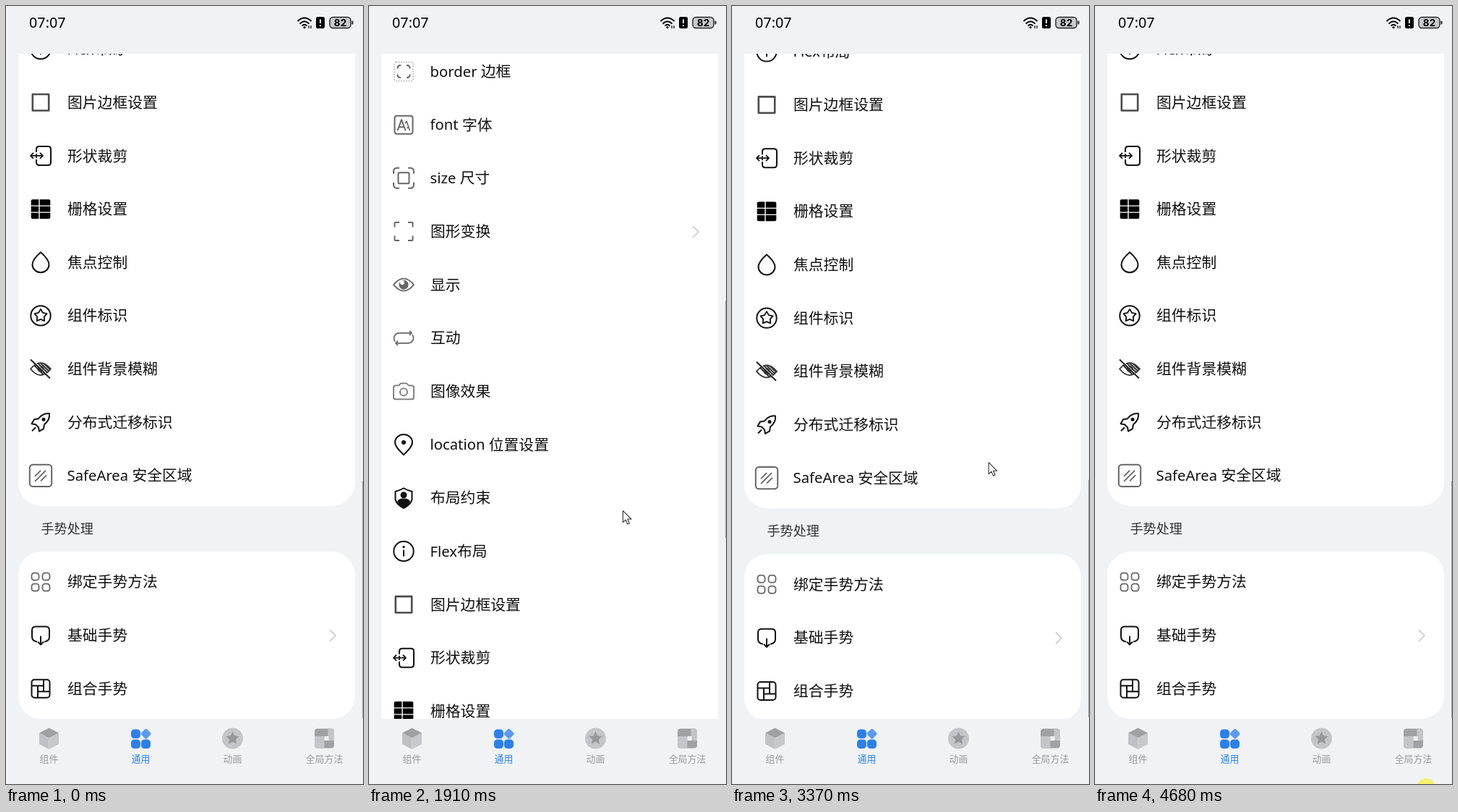
Recreate the animation shown at these times as an HTML page with a canvas. Size 494 by 1075 pixels, loop 4750 ms.

```html
<!DOCTYPE html>
<html lang="zh">
<head>
<meta charset="utf-8">
<title>组件列表</title>
<style>
  html, body { margin: 0; width: 100%; height: 100%; overflow: hidden; background: #f0f2f4; }
  canvas { display: block; width: 494px; height: 1075px; }
</style>
</head>
<body>
<canvas id="stage"></canvas>
<script>
const W = 494, H = 1075, LOOP = 4750;
const TOP = 66, BOTTOM = 985, ROW = 73.65, HEADING = 63.4, PAD = 5;
const INK = '#111', GRAY = '#666', PAPER = '#f0f2f4', BLUE = '#2b80e9';
const CJK = '"Noto Sans CJK SC", "Noto Sans CJK", sans-serif';
const LATIN = '"Noto Sans", sans-serif';

const canvas = document.getElementById('stage');
const ctx = canvas.getContext('2d');
const ratio = window.devicePixelRatio || 1;
canvas.width = W * ratio;
canvas.height = H * ratio;

// Path builders
const ring = (r, x = 0, y = 0) => `M${x - r} ${y}a${r} ${r} 0 1 1 ${2 * r} 0a${r} ${r} 0 1 1 ${-2 * r} 0z`;
const box = (x, y, w, h, r = 0) => {
  const arc = (dx, dy) => `a${r} ${r} 0 0 1 ${dx} ${dy}`;
  return `M${x + r} ${y}h${w - 2 * r}${arc(r, r)}v${h - 2 * r}${arc(-r, r)}h${2 * r - w}${arc(-r, -r)}v${2 * r - h}${arc(r, -r)}z`;
};
const square = (s, r) => box(-s, -s, 2 * s, 2 * s, r);
const star = (r, inner) => 'M' + Array.from({ length: 10 }, (_, i) => {
  const a = i * Math.PI / 5, d = i % 2 ? inner : r;
  return `${d * Math.sin(a)} ${-d * Math.cos(a)}`;
}).join('L') + 'z';
const corners = (s, gap, r) => [[-1, -1], [1, -1], [1, 1], [-1, 1]].map(([x, y]) =>
  `M${x * gap} ${y * s}H${x * (s - r)}Q${x * s} ${y * s} ${x * s} ${y * (s - r)}V${y * gap}`).join('');

// Painters
function line(d, color = INK, width = 2, dash = []) {
  ctx.strokeStyle = color;
  ctx.lineWidth = width;
  ctx.setLineDash(dash);
  ctx.stroke(new Path2D(d));
}
function fill(d, color = INK) {
  ctx.fillStyle = color;
  ctx.fill(new Path2D(d));
}
function write(text, x, y, font, color = INK, align = 'left') {
  ctx.font = font;
  ctx.fillStyle = color;
  ctx.textAlign = align;
  ctx.fillText(text, x, y);
  return ctx.measureText(text).width;
}
function at(x, y, draw) {
  ctx.save();
  ctx.translate(x, y);
  draw();
  ctx.restore();
}

const EYE = 'M-14 0Q-7 -8.5 0 -8.5T14 0Q7 8.5 0 8.5T-14 0z';
const icons = {
  tap() { line(ring(13)); fill(ring(5)); },
  touch() { line(ring(13)); line(ring(7)); },
  drag() { line(corners(13, 5, 3)); line('M-6 0H6M0 -6V6'); },
  puzzle() {
    line('M-14 -2Q-15 -10 -8 -12Q-4 -13 0 -10M-9 -1Q-10 -7 -5 -8', GRAY, 1.7);
    line('M-5 -4H-1C-4 -10 6 -11 4 -5H10V0C16 -3 16 7 10 4V11H5C7 5 -2 5 0 11H-6V6C-12 9 -12 0 -6 2', GRAY, 1.7);
  },
  unlock() {
    line('M-12.5 -2V-7Q-12 -13 -7 -13T-3 -7V-1', INK, 2.5);
    fill(box(-9, -3, 20, 17, 4));
    fill(ring(2.5, 1, 5), '#fff');
  },
  focus() {
    line(ring(4), INK, 1.8);
    line(ring(8), INK, 2);
    line(ring(12), INK, 2, [1.4, 1.5]);
  },
  press() {
    fill(box(-13, -13, 15, 26, 3));
    const fade = ctx.createLinearGradient(4, 0, 13, 0);
    fade.addColorStop(0, '#111');
    fade.addColorStop(1, '#ddd');
    fill(box(4, -13, 9, 26, 2), fade);
  },
  mouse() {
    line(box(-11, -13.5, 22, 27, 8));
    line('M-11 5Q0 9 11 5');
    line(box(-2.2, -6, 4.4, 9, 2.2), INK, 1.7);
  },
  clipboard() {
    line('M-5 -11H-7Q-11 -11 -11 -7V9Q-11 13 -7 13H7Q11 13 11 9V-7Q11 -11 7 -11H5', '#333');
    line(box(-5, -13.5, 10, 5, 1.5), '#333');
    line('M-5 2L-1 6L6 -2', '#333');
  },
  hatch() {
    line(square(15.2, 4.5), GRAY);
    line('M-8 1L0 -7M-8 8L7 -7M0 7.5L8 -.5', GRAY, 1.8);
  },
  border() {
    line(square(13, 2), '#999', 1.3, [1.5, 2]);
    line(corners(8.5, 4, 4), GRAY);
  },
  font() {
    line(square(12.5, 3), GRAY);
    line('M-8.5 8L-3 -7L2.5 8M-6.5 3H.5', GRAY, 1.9);
    line('M2 -2L4 -5L8.5 8M4 4H7', GRAY, 1.6);
  },
  size() { line(corners(14, 6, 5), GRAY); line(square(7.5, 1), GRAY); },
  expand() { line(corners(12.5, 6, 1), GRAY); },
  eye() {
    line(EYE, GRAY, 1.8);
    fill(ring(6.5), GRAY);
    fill(ring(3, -2, -3), '#fff');
  },
  loop() {
    line('M-12 5Q-15 -1 -12 -4Q-10 -7 -6 -7H11M8 -10L11 -7L8 -4', GRAY, 1.7);
    line('M12 -5Q15 1 12 4Q10 7 6 7H-11M-8 4L-11 7L-8 10', GRAY, 1.7);
  },
  camera() {
    line('M-11 -8H-7L-4 -11H4L7 -8H11Q14 -8 14 -5V8Q14 11 11 11H-11Q-14 11 -14 8V-5Q-14 -8 -11 -8z', '#777', 1.8);
    line(ring(5, 0, 1), '#777', 1.8);
  },
  pin() {
    line('M0 14C-7 7 -12 2 -12 -3A12 11 0 0 1 12 -3C12 2 7 7 0 14z');
    fill(ring(3, 0, -3));
  },
  shield() {
    line('M0 -13.5Q6 -10 11.5 -9V2Q10 9 0 14Q-10 9 -11.5 2V-9Q-6 -10 0 -13.5z');
    fill(ring(4.5, 0, -4));
    fill('M-9 5Q-6 0 0 1Q6 0 9 5Q6 11 0 13Q-6 11 -9 5z');
  },
  info() { line(ring(13.7)); line('M0 -2V7'); fill(ring(1.6, 0, -6)); },
  frame() { line(square(11.2), '#4c4c4c', 2.6); },
  crop() {
    line('M-6 -5V-9Q-6 -13 -2 -13H10Q14 -13 14 -9V9Q14 13 10 13H-2Q-6 13 -6 9V5');
    line('M-14 0H3M-10 -4L-14 0L-10 4M-1 -4L3 0L-1 4M-6 -3V3', INK, 1.8);
  },
  grid() {
    fill(square(13.3, 2), '#000');
    line('M-2 -14V14M-14 -4.5H14M-14 4.5H14', '#fff', 1.4);
  },
  drop() { line('M0 -14Q11.5 -4 11.5 3A11.5 11 0 0 1 -11.5 3Q-11.5 -4 0 -14z'); },
  badge() { line(ring(13.7)); line(star(9, 5), INK, 1.8); },
  blur() {
    ctx.save();
    ctx.clip(new Path2D(EYE));
    line('M-16 -12L8 12M-12 -12L12 12M-8 -12L16 12M-4 -12L18 10M0 -12L18 6', '#333', 2);
    ctx.restore();
    fill(ring(4.5), '#333');
    line(EYE, '#333', 1.8);
    line('M-12 -13L14 13', '#fff', 1.5);
    line('M-14 -13L13 13', '#222', 2);
  },
  rocket() {
    line('M12 -12Q3 -13 -3 -5L-9 -4L-12.5 2L-7 3L-3 7L-2 12.5L4 9L5 3Q13 -3 12 -12z');
    line('M-7 7L-12 12');
    fill(ring(2.5, 4, -4));
  },
  apps() {
    for (const x of [-12.5, 2.5]) for (const y of [-12.5, 2.5]) line(box(x, y, 10, 10, 3.5), GRAY, 1.8);
  },
  gesture() {
    line('M-5 9Q-12 8 -12 2V-7Q-12 -12 -7 -12H7Q12 -12 12 -7V2Q12 8 5 9');
    line('M0 1V13M-4 9L0 13L4 9');
  },
  combine() {
    line(square(12.5, 4));
    line('M-12 -4H4V-12M4 -4V4M-4 -4V12M-4 4H12');
  },
};

const sections = [
  ['通用事件', [['点击事件', 'tap'], ['触摸事件', 'touch'], ['拖拽事件', 'drag'],
    ['组件区域变化事件', 'puzzle'], ['挂载卸载事件', 'unlock'], ['焦点事件', 'focus'],
    ['按压事件', 'press'], ['鼠标事件', 'mouse'], ['组件可见区域变化事件', 'clipboard']]],
  ['通用属性', [['Foreground 前景', 'hatch'], ['background 背景', 'hatch'], ['border 边框', 'border'],
    ['font 字体', 'font'], ['size 尺寸', 'size'], ['图形变换', 'expand', true], ['显示', 'eye'],
    ['互动', 'loop'], ['图像效果', 'camera'], ['location 位置设置', 'pin'], ['布局约束', 'shield'],
    ['Flex布局', 'info'], ['图片边框设置', 'frame'], ['形状裁剪', 'crop'], ['栅格设置', 'grid'],
    ['焦点控制', 'drop'], ['组件标识', 'badge'], ['组件背景模糊', 'blur'],
    ['分布式迁移标识', 'rocket'], ['SafeArea 安全区域', 'hatch']]],
  ['手势处理', [['绑定手势方法', 'apps'], ['基础手势', 'gesture', true], ['组合手势', 'combine']]],
];
const cardHeight = rows => rows.length * ROW + 2 * PAD;
const contentHeight = sections.reduce((sum, [, rows]) => sum + HEADING + cardHeight(rows), 0);
const LIST_START = BOTTOM - TOP - contentHeight;

// Distance from the end of the list: [ms, px]
const scroll = [[0, 0], [460, 0], [460, -LIST_START], [740, 1364.3], [1010, 1270], [1150, 1195],
  [1290, 1160], [1360, 1152.3], [1430, 1152.3], [1500, 1120], [1780, 800], [1900, 700], [2050, 615],
  [2190, 585], [2460, 585], [2530, 568], [2990, 190], [3050, 173], [3180, 173], [3320, 40],
  [3420, -32], [3520, -45], [3710, -14], [3900, -3], [4070, 0], [LOOP, 0]];
const touches = [
  { from: 460, to: 1010, shift: -847, x: [[460, 90], [700, 27], [1010, 27]] },
  { from: 1430, to: 1800, shift: -363, x: [[1430, 112], [1800, 80]] },
  { from: 2460, to: 3250, shift: 244.5, x: [[2460, 119], [3050, 74], [3250, 72]] },
];
const pointerX = [[1290, 357], [1430, 357], [2460, 345], [3050, 341], [3640, 367], [3800, 367]];
const pointerY = [[1290, 703], [1430, 703], [2460, 691], [3050, 678], [3640, 591], [3800, 591]];

function track(points, t) {
  const i = points.findLastIndex(p => p[0] <= t);
  const [t0, v0] = points[i], [t1, v1] = points[i + 1] || [t0 + 1, v0];
  return v0 + (v1 - v0) * (t - t0) / (t1 - t0);
}

function drawRow([label, icon, hasMore], y) {
  at(48, y, icons[icon]);
  const latin = label.match(/^[\w ]*/)[0];
  const width = latin ? write(latin, 84.5, y + 7.2, `500 20.3px ${LATIN}`) : 0.5;
  write(label.slice(latin.length), 84.5 + width, y + 7.6, `500 20.8px ${CJK}`);
  if (hasMore) line(`M448 ${y - 7.5}l8 8l-8 8`, '#c6c7ca', 1.6);
}

function drawList(offset) {
  ctx.save();
  ctx.beginPath();
  ctx.rect(0, TOP, W, BOTTOM - TOP);
  ctx.clip();
  let y = TOP + LIST_START + offset;
  for (const [title, rows] of sections) {
    write(title, 48.5, y + HEADING / 2 + 6.7, `500 18.1px ${CJK}`, '#333');
    y += HEADING;
    fill(box(17, y, 466, cardHeight(rows), 32), '#fff');
    rows.forEach((row, i) => {
      const center = y + PAD + (i + 0.5) * ROW;
      if (center > TOP - 40 && center < BOTTOM + 40) drawRow(row, center);
    });
    y += cardHeight(rows);
  }
  const barTop = 656 - (offset > 0 ? offset * 0.3585 : offset);
  fill(box(493, barTop, 1, Math.min(328, BOTTOM - 1 - barTop)), '#a4a6a8');
  ctx.restore();
}

function drawStatus() {
  write('07:07', 32, 30, `500 19.8px ${LATIN}`, '#000');
  at(413, 28, () => {
    line('M-9.5 -7Q0 -16 9.5 -7M-6.5 -3.5Q0 -10 6.5 -3.5M-3.5 -.5Q0 -4 3.5 -.5', '#000', 2);
    fill(ring(1.6, 0, 1.5), '#000');
    line('M6 -1V3M9 -1V3', '#000', 1.2);
  });
  fill(box(429, 15, 12, 16, 2.5), '#000');
  line('M435 18.5V24M435 26V28', '#fff', 2);
  fill(box(448, 15.5, 29, 15, 4.5), '#c9cacc');
  line(box(448, 15.5, 29, 15, 4.5), '#222', 1.4);
  fill(box(478.5, 20.5, 2, 5, 1), '#222');
  write('82', 462.5, 28, '700 13.5px Inter, sans-serif', '#000', 'center');
}

const tabs = [
  ['组件', () => {
    fill('M0 -14.5L13.5 -7.5L0 -.5L-13.5 -7.5z', '#9fa0a4');
    fill('M-13.5 -7.5L0 -.5V15L-13.5 8z', '#c0c1c4');
    fill('M13.5 -7.5L0 -.5V15L13.5 8z', '#c7c8cb');
  }],
  ['通用', () => {
    fill(box(-13.5, -12.5, 13, 12.5, 4.5) + box(-13.5, 1.5, 13, 12.5, 4.5) + box(.5, 1.5, 13, 12.5, 4.5), BLUE);
    at(7.2, -6.3, () => {
      ctx.rotate(Math.PI / 4);
      fill(square(5.5, 2), '#5b9af0');
    });
  }],
  ['动画', () => { fill(ring(14.5), '#c4c5c8'); fill(star(9.5, 4.6), '#97989c'); }],
  ['全局方法', () => {
    fill(square(13.5, 4), '#a0a1a4');
    fill('M-13.5 -3H0V13.5H-9.5Q-13.5 13.5 -13.5 9.5z', '#c4c5c8');
    fill('M5 -13.5H9.5Q13.5 -13.5 13.5 -9.5V3H5z', '#c4c5c8');
    fill(box(0, -3, 6, 6), '#eeeff1');
  }],
];
function drawTabs() {
  tabs.forEach(([label, icon], i) => {
    const x = 59.5 + i * 127, active = i === 1;
    at(x, 1012, icon);
    write(label, x, 1045, `${active ? 500 : 400} 12.9px ${CJK}`, active ? BLUE : '#999a9d', 'center');
  });
}

function drawPointer(x, y) {
  at(x, y, () => {
    const arrow = 'M0 0V16L3.8 12.6L6.5 18.5L9 17.3L6.4 11.6H11.6z';
    fill(arrow, '#fff');
    line(arrow, '#333', 1.1);
  });
}

function draw(t) {
  const offset = track(scroll, t);
  ctx.setTransform(ratio, 0, 0, ratio, 0, 0);
  ctx.lineJoin = 'round';
  fill(box(0, 0, W, H), PAPER);
  drawList(offset);
  drawStatus();
  drawTabs();

  const touch = touches.find(({ from, to }) => t >= from && t < to);
  if (touch) {
    const spot = ring(13.8, track(touch.x, t), offset + touch.shift);
    fill(spot, 'rgba(255,255,255,.75)');
    line(spot, '#e0e1e3', 2.3);
  }
  if (t >= 1290 && t < 3800) drawPointer(track(pointerX, t), track(pointerY, t));
  if (t >= 3700 && t < 3800) drawPointer(305, 1014);
  if (t >= 4680) fill(ring(12, 458, 1079), '#f6f26c');
}

function tick() {
  draw(performance.now() % LOOP);
  requestAnimationFrame(tick);
}
tick();
</script>
</body>
</html>
```
